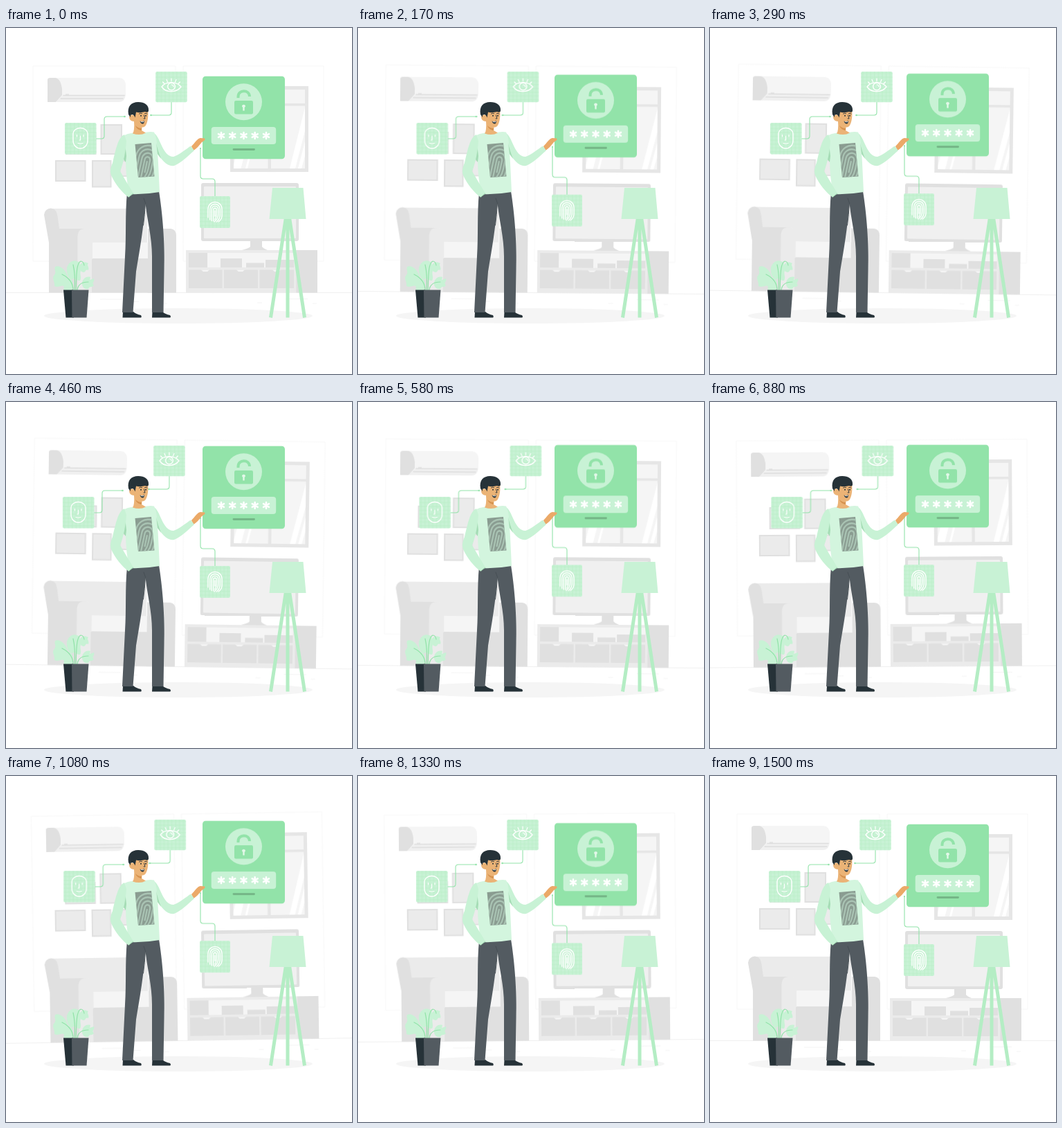
These frames come from a looping animation (500x500 px, 1.54 s). An HTML page:

```html
<!DOCTYPE html>
<html lang="en">
<head>
<meta charset="utf-8">
<title>Smart home access</title>
<style>
html, body { margin: 0; width: 100%; height: 100%; overflow: hidden; background: #fff; }
svg { display: block; width: 100vw; height: 100vh; }

/* 1.5 s of motion, then a 40 ms rest */
.room, .float, .shake { animation: 1540ms linear infinite; }
.room { animation-name: sway; transform-origin: 250px 225px; }
.float { animation-name: float; }
.shake { animation-name: shake; animation-timing-function: ease; }

@keyframes sway {
  0%, 97.4%, 100% { transform: rotate(0deg); }
  24.35% { transform: rotate(1deg); }
  73.05% { transform: rotate(-1deg); }
}
@keyframes float {
  0%, 97.4%, 100% { transform: translateY(0); }
  48.7% { transform: translateY(-9.9px); }
  70.1% { transform: translateY(-4.9px); }
  86.4% { transform: translateY(-1.7px); }
}
@keyframes shake {
  0%, 97.4%, 100% { transform: translateX(0); }
  9.74%, 87.66% { transform: translateX(-1px); }
  19.48%, 77.92% { transform: translateX(2px); }
  29.22%, 48.7%, 68.18% { transform: translateX(-3.5px); }
  38.96%, 58.44% { transform: translateX(3.5px); }
}

.g0 { fill: #e0e0e0; }
.g1 { fill: #e6e6e6; }
.g2 { fill: #ebebeb; }
.g3 { fill: #f0f0f0; }
.g4 { fill: #f5f5f5; }
.dark { fill: #263238; }
.slate { fill: #535b61; }
.skin { fill: #ebb376; }
.green { fill: #92e3a9; }
.mint { fill: #c8f2d5; }
.shirt { fill: #d3f5de; }
.line { fill: none; stroke-linecap: round; stroke-linejoin: round; }
.wire { stroke: #92e3a9; stroke-width: 1.1; }
.icon { stroke: #fff; stroke-width: 1.4; }
.ink { stroke: #263238; stroke-width: .9; }
</style>
</head>
<body>
<svg viewBox="0 0 500 500">
  <defs>
    <pattern id="grid" width="5.6" height="5.6" patternUnits="userSpaceOnUse">
      <path d="M0 2.8H5.6M2.8 0V5.6" stroke="#b5ecc4" stroke-width=".6"/>
    </pattern>
    <g id="card">
      <rect width="45.5" height="45.5" rx="2" class="mint"/>
      <rect width="45.5" height="45.5" rx="2" fill="url(#grid)"/>
    </g>
    <g id="star" stroke="#fff" stroke-width="2.6" stroke-linecap="round">
      <path d="M0-4.4V4.4M-4-2.3L4 2.3M-4 2.3L4-2.3"/>
    </g>
    <g id="print" class="line">
      <path d="M-10 8V-4C-10-18 10-18 10-4V5C10 9 8 12 5 14"/>
      <path d="M-7.3 11V-4C-7.3-14 7.3-14 7.3-4V4C7.3 9 5 12 2 14.2"/>
      <path d="M-4.7 12.8V-3.5C-4.7-10.4 4.7-10.4 4.7-3.5V3C4.7 8 3 11-1 14"/>
      <path d="M-2.2 13V-3C-2.2-6.6 2.2-6.6 2.2-3V3C2.2 7 1.2 9 0 11"/>
      <path d="M0-2V6"/>
    </g>
    <clipPath id="tee"><path d="M186.5 168L210 166 214.500 214.500 191 216Z"/></clipPath>
  </defs>

  <g class="room">
    <path d="M39 55H245V337H39ZM256 55H459V337H256Z" fill="none" stroke="#f7f7f7"/>
    <path d="M-5 382.500H505" stroke="#ececec" stroke-width=".8"/>
    <path d="M404 391.500H436M443 398H449M363 397H370M136 392H168M175 395.500H192M214 398H233" stroke="#f2f2f2" stroke-width=".8"/>

    <!-- air conditioner -->
    <path d="M70 72H164Q173 73 173 83V96Q172 107 164 107H70Z" class="g4"/>
    <path d="M60 107V75Q60 72 64 72H71Q79 73 81 88V97L72 107Z" class="g0"/>
    <path d="M72 107L83 96.500H172.500Q171 107 163 107Z" class="g3"/>
    <path d="M83 97.500H171M79 102H169" class="line" stroke="#dedede" stroke-width="1.3"/>
    <path d="M86 96H91" stroke="#ccc" stroke-width=".7"/>

    <!-- picture frames -->
    <g fill="#ebebeb" stroke="#e0e0e0" stroke-width="2">
      <path d="M87 152H129.500V182H87ZM137.500 140H167V182H137.500ZM72 192H114.500V221H72ZM125 192H151.500V229.500H125ZM164.500 192H205V214H164.500Z"/>
    </g>

    <!-- window -->
    <path d="M324 84H437V208H324Z" class="g1"/>
    <path d="M329 89H378.500V109H329ZM383 89H432V109H383ZM329 112.500H378.500V203H329ZM383 112.500H432V203H383Z" class="g4"/>
    <path d="M410 203L432 115V149L418 203ZM422 203L432 164V185L427 203ZM329 198L346 130H358L339.500 203H329ZM346 203L358 155H361L349 203Z" fill="#fff"/>

    <!-- sofa -->
    <path d="M66 261H196Q204 261 204 270V312H66Z" class="g2"/>
    <path d="M205 290H238Q246 291 246 300V382.500H205Z" class="g0"/>
    <path d="M122 333H211V382.500H122Z" class="g0"/>
    <path d="M122 310H205V333H122Z" class="g4"/>
    <path d="M55 270Q56 261 65 260.500Q73 261 74.500 272L77 290H114V382.500H62V310Z" class="g0"/>
    <path d="M103.500 301Q104 290 114 290Q124 290 125 301V334H124V382.500H103.500Z" class="g2"/>

    <!-- television -->
    <path d="M353 306H370V316Q371 318 378 321H341Q352 318 353 316Z" class="g0"/>
    <rect x="282" y="224" width="141" height="84" rx="3" class="g0"/>
    <rect x="286" y="229" width="133" height="75" rx="1" class="g3"/>

    <!-- cabinet -->
    <path d="M260 321H450V382.500H260Z" class="g2"/>
    <path d="M264 325H416V346H264Z" class="g4"/>
    <path d="M264 325H291V346H264ZM310 333H341V346H310ZM347 339.500H373V346H347ZM375 335H416V346H375ZM264 349.500H312.500V376H264ZM315 349.500H364V376H315ZM366.500 349.500H416V376H366.500ZM419.500 321H450V382.500H419.500Z" class="g0"/>
    <path d="M282 349.500H294L291 352H285ZM333 349.500H345L342 352H336ZM385 349.500H397L394 352H388Z" class="g4"/>
  </g>

  <ellipse cx="249" cy="416" rx="194" ry="11" class="g4"/>

  <!-- floor lamp -->
  <g class="line" stroke="#b4edc4" stroke-width="5" style="stroke-linecap:butt">
    <path d="M404.500 274L382.500 418.500M409.500 274L431.500 418.500M407 274V418.500"/>
  </g>
  <path d="M385 231H429.500L433.500 276H380.500Z" class="mint"/>

  <!-- plant -->
  <g class="mint">
    <path d="M89 360C87 350 78 342 71 345C69 350 74 353 69 358C66 363 71 366 70 373C77 376 81 370 84 374C82 380 88 384 92 382C97 378 98 369 95 364Z"/>
    <path d="M88 346C91 337 99 333 106 339C109 344 105 347 108 351C106 356 110 360 107 365C101 366 99 358 97 363C91 365 87 355 88 346Z"/>
    <path d="M106 345C108 338 114 337 119 340C116 343 121 345 119 350C114 348 116 353 112 353C108 352 105 349 106 345Z"/>
    <path d="M110 371C109 363 116 358 122 360L121 364 127 362C129 367 123 367 127 372C123 376 121 372 119 377C114 378 111 375 110 371Z"/>
  </g>
  <path d="M97 379C97 369 91 361 81 356M99 379C100 363 99 350 97 342M101 379C102 361 101 340 108 337Q112 337 113 343M103 379C104 369 112 367 119 367" class="line" stroke="#92e3a9" stroke-width="1.2"/>
  <path d="M83 378.500H97L98 418.500H86.500Z" class="dark"/>
  <path d="M95 378.500H119.500L116.500 418.500H95.500Z" class="slate"/>

  <g class="float">
    <path d="M281 174V214Q281 218 285 218H298Q302 218 302 222V243" class="line wire"/>
    <circle cx="281" cy="174" r="1.1" class="green"/>
    <use href="#card" transform="translate(280 243) scale(.967 1.01)"/>
    <use href="#print" x="302" y="266" class="icon"/>

    <rect x="284" y="69.700" width="119" height="119.500" rx="4.500" class="green"/>
    <circle cx="343.500" cy="106.800" r="26.500" class="mint"/>
    <path d="M335.500 101V99.500C335.500 88.500 351.500 88.500 352 99" fill="none" stroke="#92e3a9" stroke-width="4"/>
    <rect x="330" y="105" width="27" height="19.500" rx="2.200" class="green"/>
    <path d="M341 113.300A2.500 2.500 0 1 1 346 113.300L344.700 115V119.500H342.300V115Z" fill="#e3f8e9"/>
    <rect x="296.700" y="143" width="93.500" height="25" rx="4" class="mint"/>
    <use href="#star" x="311" y="155.500"/>
    <use href="#star" x="327.200" y="155.500"/>
    <use href="#star" x="343.500" y="155.500"/>
    <use href="#star" x="359.700" y="155.500"/>
    <use href="#star" x="376" y="155.500"/>
    <path d="M329 175.500H358.500" class="line" stroke="#75b687" stroke-width="2.800"/>
  </g>

  <g class="shake">
    <path d="M239 107V122Q239 126 235 126H210M130 160H138Q142 160 142 156V132Q142 128 146 128H171" class="line wire"/>
    <circle cx="209.500" cy="126" r="1.300" class="green"/>
    <circle cx="171.500" cy="128" r="1.300" class="green"/>

    <use href="#card" transform="translate(216.200 63) scale(1 .97)"/>
    <g class="line icon">
      <path d="M225 85C231 76.500 246 76.500 253 85C246 94 231 94 225 85Z"/>
      <circle cx="239" cy="84.500" r="5.300"/>
      <path d="M239 82Q242 82 242 85M239 73V77M232 74.500L233.500 78M246 74.500L244.500 78M226.500 78L229 80.500M251.500 78L249 80.500" stroke-width="1.200"/>
    </g>

    <use href="#card" x="85" y="137"/>
    <g class="line icon">
      <path d="M97 153.500C97 141.500 118 141.500 118 153.500V162C118 178 97 178 97 162Z"/>
      <path d="M102.500 154.500V157M112 154.500V157M107.500 156V162H106M104 166.500Q107.500 168 111 166.500" stroke-width="1.200"/>
    </g>
  </g>

  <!-- legs and shoes -->
  <path d="M169 410H184Q188 413.500 195 415Q196.500 418 195 418.500H168.500Z" class="dark"/>
  <path d="M211.500 410H226Q230 413.500 237 415Q239 418 237 418.500H211Z" class="dark"/>
  <path d="M175 238L221 236C226 266 230 312 228.500 350L227.500 411H211V330C211 302 204 279 201.500 253C199 288 193 322 188 352L183.500 411H168L172 330C174 300 172 268 175 238Z" class="slate"/>
  <path d="M199 246L201.500 253Q200.500 270 198.500 285" class="line" stroke="#444d53" stroke-width=".9"/>

  <!-- reaching arm and hand -->
  <path d="M268 171C273 166 276 160 281 159L287 159.500Q288.500 161 286 163L283 165C279 170 276 174 271 177Z" fill="#eba968"/>
  <path d="M210 151C217 151 220 159 224 168C229 179 234 186 242 186C251 183 260 175 267 170.500L272 177C263 185 253 195 243 199C233 201 224 190 217 178Z" class="mint"/>

  <!-- body -->
  <path d="M176 153Q187 150 197 152Q207 149 214 150.500C219 160 219 178 220 195L222 237Q200 241 178 240Q173 214 173 192L167 160Q169 155 176 153Z" class="shirt"/>
  <path d="M217 166L219 182 224 189Q219 176 217 166Z" fill="#a5dcb5"/>
  <path d="M172 167Q168 178 170 190L173 194 174 185Z" fill="#a5dcb5"/>
  <path d="M171 154C162 158 159 174 154 195Q149 206 152 213C158 226 168 238 177 244.500L184 239C177 227 170 216 165 207C170 194 173 178 174 163Z" class="mint"/>
  <path d="M177 244.500L184 239" stroke="#a5dcb5"/>

  <path d="M186.500 168L210 166 214.500 214.500 191 216Z" fill="#8a9c91"/>
  <g clip-path="url(#tee)">
    <use href="#print" transform="translate(203 197) rotate(12) scale(1.750 1.900)" stroke="#a9c3b3" stroke-width="1.300"/>
  </g>

  <!-- head -->
  <path d="M185 134L197 140 196 148 202 151.500Q194 156 183 152.500Q186 149 185 134Z" class="skin"/>
  <path d="M187 141Q191 145 196 145L196 148Q189 147 187 141Z" fill="#d6924f"/>
  <path d="M185 117H205C206 128 205 137 201 142Q197 145 191 142Q186 139 185 135Q178 135 178 128Q179 124 184 126Z" class="skin"/>
  <path d="M177 125C175 113 181 107 191 107C200 107 207 111 206 120Q205 123 201 121Q194 123 188 121.500L186.500 129.500Q184 123 180 126L180 129Z" class="dark"/>
  <path d="M192.500 124Q194.500 122.500 196.500 123.500M200.500 123.500Q202 122.500 204 124M199.500 126L201 131H199" class="line ink"/>
  <circle cx="195" cy="126.800" r="1" class="dark"/>
  <circle cx="202" cy="126.800" r="1" class="dark"/>
  <path d="M193.500 134.500Q197 136 200 134Q200 138.500 197 138.500Q194.500 138 193.500 134.500Z" class="dark"/>
  <path d="M194.500 135Q197 136 199.500 134.700V135.800Q197 136.800 195 136Z" fill="#fff"/>
</svg>
</body>
</html>
```
